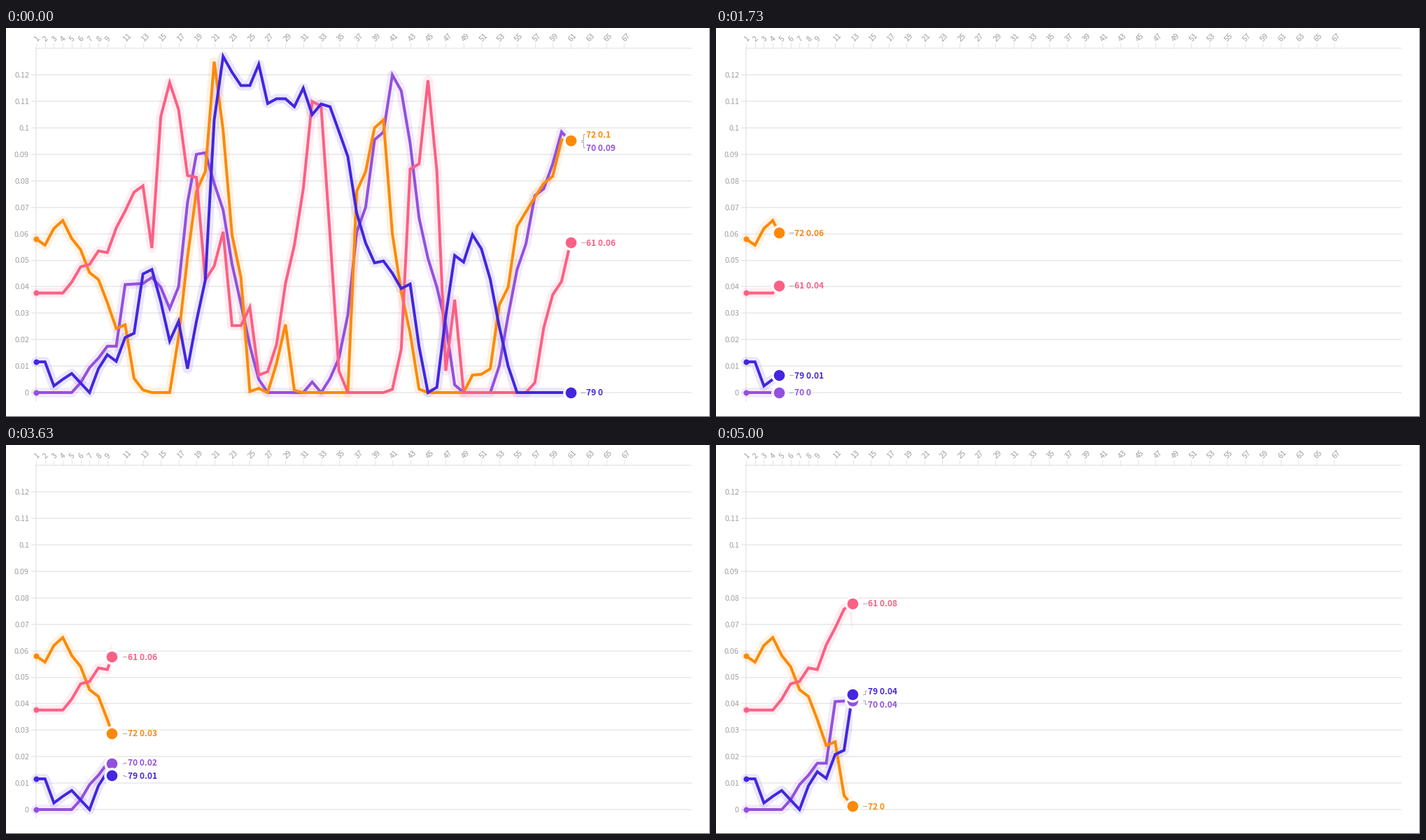
These frames come from a looping animation (1006x557 px, 5.03 s). A matplotlib script:

```python
import numpy as np
import matplotlib.pyplot as plt
from matplotlib.animation import FuncAnimation
from matplotlib.patches import Rectangle

W, H, DPI = 1006, 557, 100
FRAMES, LOOP = 151, 5030
PT = 72 / DPI
FONT = "Noto Sans CJK JP"
X0, STEP = 43, 12.727
Y0, SCALE = 522, 3.79          # pixels per thousandth
REWIND_START, REWIND_END = 0.7, 6.7
FRAMES_PER_DAY = 12
LABEL_GAP = 19

# values in thousandths, one per day
purple = ([0] * 5 + [3.7, 9.4, 13, 17.5, 17.5, 40.8, 41, 41.2, 43.5, 39.8, 31.7,
          40, 71.7, 90, 90.6, 79, 69, 48.5, 33.5, 17.7, 5] + [0] * 5 +
          [4, 0, 5.3, 13, 29.3, 60.7, 70, 95.5, 98.4, 120, 114, 94.2, 66, 50.7,
           39.8, 25.6, 2.9] + [0] * 4 +
          [10, 29, 46.4, 56.2, 74.4, 77, 86.3, 98.5, 94.8])
orange = ([58, 55.7, 62, 65, 58.2, 54, 45.3, 42.7, 34, 24.2, 25.6, 5.3, 1, 0, 0, 0,
           21, 51, 76, 83.5, 125, 99, 59.6, 43.5, .4, 1.6, 0, 11, 25.7, .8] +
          [0] * 6 + [76, 83.5, 100, 103, 60, 38, 22.5, 1.3] + [0] * 5 +
          [6.6, 6.9, 9, 33, 39.8, 62.7, 68.3, 73.8, 79, 81.7, 95.5, 95.3])
pink = ([37.6] * 4 + [41.7, 47.5, 48.4, 53.5, 52.9, 62.2, 68.6, 75.7, 78.1, 54.6,
        104.2, 117.1, 106.9, 82, 81.3, 42.5, 47.8, 60.7, 25.3, 25.3, 32.2, 6.6,
        7.9, 18.2, 41.2, 55.7, 77, 110, 108.2, 59.4, 8.2] + [0] * 5 +
        [1.2, 16.4, 84.4, 86.4, 118, 83.6, 8.2, 35.1] + [0] * 8 +
        [3.7, 24.5, 36.9, 42, 56.7])
blue = ([11.6, 11.6, 2.5, 5, 7.2, 3.6, 0, 9, 14.3, 11.8, 20.8, 22.4, 44.8, 46.5,
         34.3, 19.5, 26.9, 9, 26.9, 42.5, 103, 127, 121, 116, 116, 124, 109.2,
         111, 111, 108, 115, 105, 109, 108, 98.7, 89.2, 67.8, 56.5, 49, 49.7,
         45.1, 39.3, 41, 17.4, 0, 2, 29, 51.8, 49.3, 59.6, 54.3, 42.7, 25, 10] +
        [0] * 7)

SERIES = [("70", "#9350de", purple), ("72", "#fb8a08", orange),
          ("61", "#fb6085", pink), ("79", "#4326df", blue)]
DAYS = np.arange(1, 62)


def px(day):
    return X0 + (day - 1) * STEP


def py(value):
    return Y0 - np.asarray(value) * SCALE


fig = plt.figure(figsize=(W / DPI, H / DPI), dpi=DPI, facecolor="white")
ax = fig.add_axes([0, 0, 1, 1])
ax.set_xlim(0, W)
ax.set_ylim(H, 0)
ax.axis("off")


def line(xs, ys, color, width, z, **kw):
    return ax.plot(xs, ys, color=color, lw=width * PT, zorder=z, **kw)[0]


def dot(x, y, radius, color, z):
    return ax.plot([x], [y], "o", ms=2 * radius * PT, mfc=color, mew=0, zorder=z)[0]


def text(x, y, s, size, color, **kw):
    return ax.text(x, y, s, fontsize=size * PT, color=color, family=FONT, **kw)


def draw_axes():
    grid = "#e8e8e8"
    for i in range(14):
        y = py(i * 10)
        line([43 if i == 13 else 37, 979], [y, y], grid, 1.5, 1)
        if i < 13:
            text(33, y + 4, f"{i / 100:g}", 10.8, "#a0a0a0", ha="right", va="baseline")
    line([X0, X0], [29, 534], grid, 1.5, 1)
    for day in [*range(1, 10), *range(11, 68, 2)]:
        x = px(day)
        line([x, x], [22, 29], grid, 1.2, 1)
        text(x + 1, 19.5, str(day), 10.8, "#a0a0a0", rotation=45,
             rotation_mode="anchor", ha="left", va="baseline")
    ax.add_patch(Rectangle((0, H - 1), W, 1, color="#5a5a5a", lw=0, zorder=20))
    ax.add_patch(Rectangle((W - 1, 0), 1, H, color="#8a8a8a", lw=0, zorder=20))


class Runner:
    def __init__(self, order, name, color, values):
        self.name, self.values = name, values
        xs, ys = px(DAYS), py(values)
        joins = dict(solid_capstyle="round", solid_joinstyle="round")
        self.halo = line(xs, ys, color, 14, 2 + order / 10, alpha=0.11, **joins)
        self.path = line(xs, ys, color, 4, 3 + order / 10,
                         solid_capstyle="butt", solid_joinstyle="miter")
        dot(xs[0], ys[0], 4, color, 4 + order / 10)
        self.ring = dot(0, 0, 11.3, "white", 5 + order / 10)
        self.head = dot(0, 0, 7.8, color, 5.05 + order / 10)
        self.leader = line([], [], "#a8a8a8", 1, 7)
        self.label = text(0, 0, "", 12, color, weight="bold", va="baseline", zorder=7)

    def value(self, day):
        return np.interp(day, DAYS, self.values)

    def place(self, day, label_y):
        x, v = px(day), self.value(day)
        y = py(v)
        clip = Rectangle((0, 0), x, H, transform=ax.transData)
        for part in (self.halo, self.path):
            part.set_clip_path(clip)
        for part in (self.ring, self.head):
            part.set_data([x], [y])
        self.leader.set_data([x + 15.5, x + 18, x + 18, x + 20.5],
                             [y, y, label_y, label_y])
        self.label.set_position((x + 22.5, label_y + 4.5))
        self.label.set_text(f"{self.name} {round(v / 1000, 2):g}")


def spread(ys):
    """Push labels apart around the centre of each crowded group."""
    order = np.argsort(ys, kind="stable")
    groups = []
    for i in order:
        groups.append(([i], ys[i]))
        while len(groups) > 1:
            (a, ca), (b, cb) = groups[-2:]
            if cb - ca >= LABEL_GAP * (len(a) + len(b)) / 2:
                break
            mean = (ca * len(a) + cb * len(b)) / (len(a) + len(b))
            groups[-2:] = [(a + b, mean)]
    out = np.zeros(len(ys))
    for members, centre in groups:
        for n, i in enumerate(members):
            out[i] = centre + (n - (len(members) - 1) / 2) * LABEL_GAP
    return out


def day_at(frame):
    if frame < REWIND_END:
        u = max(0, frame - REWIND_START) / (REWIND_END - REWIND_START)
        return 1 + 60 * (1 - u) ** 3
    return 1 + (frame - REWIND_END) / FRAMES_PER_DAY


draw_axes()
runners = [Runner(i, *s) for i, s in enumerate(SERIES)]


def update(frame):
    day = day_at(frame)
    labels = spread([float(py(r.value(day))) for r in runners])
    for r, y in zip(runners, labels):
        r.place(day, y)
    return []


anim = FuncAnimation(fig, update, frames=FRAMES, interval=LOOP / FRAMES,
                     init_func=lambda: update(0), repeat=True, repeat_delay=0)
plt.show()
```
